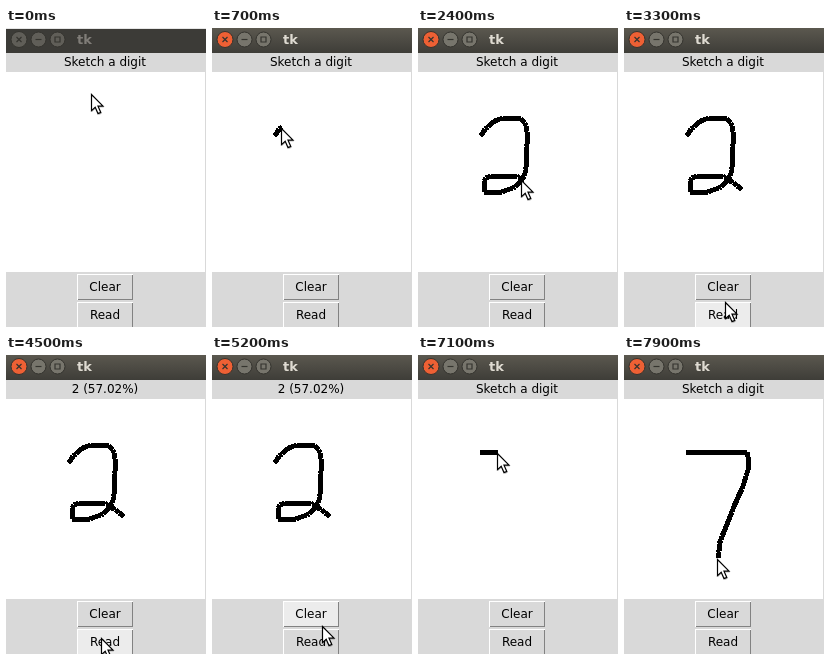
Recreate the animation shown at these times as an HTML page. Size 200 by 299 pixels, loop 8000 ms.

```html
<!DOCTYPE html>
<html lang="en">
<head>
<meta charset="utf-8">
<title>tk</title>
<style>
  html, body { margin: 0; width: 100%; height: 100%; overflow: hidden; background: #d9d9d9; }
  body { position: relative; font: 12px "DejaVu Sans", sans-serif; text-align: center; }
  body > * { position: absolute; left: 0; }
  svg { top: 0; width: 200px; height: 299px; }
  #bar { top: 0; width: 200px; height: 25px; background: linear-gradient(#5b584f, #3e3d38); color: #dfdbd2; }
  #bar.idle { background: #3c3b37; box-shadow: inset 0 1px #e6e6e6; color: #807d78; }
  #bar b { position: absolute; left: 71px; font-size: 13px; line-height: 23px; }
  #bar circle { fill: #77756c; stroke: #34332e; }
  #bar g:first-child circle { fill: #ee6034; }
  #bar.idle g circle { fill: #605e58; }
  #bar path { fill: none; stroke: #35342f; stroke-width: 1.2; }
  #label { top: 25px; width: 198px; line-height: 18px; }
  #paper { top: 44px; width: 199px; height: 200px; background: #fff; }
  .button { left: 71px; width: 56px; height: 26px; line-height: 26px;
            box-shadow: inset 1px 1px #fff, inset -1px -1px #828282; }
  .button.hot { background: #ececec; }
  .button.down { box-shadow: inset 1px 1px #828282, inset -1px -1px #fff; text-indent: 2px; line-height: 28px; }
  #ink { fill: none; stroke: #000; stroke-width: 5; shape-rendering: crispEdges; }
</style>
</head>
<body>
<div id="bar">
  <svg>
    <g transform="translate(13 11.5)"><circle r="8"/><path d="M-2.5-2.5L2.5 2.5M2.5-2.5L-2.5 2.5"/></g>
    <g transform="translate(32.5 11.5)"><circle r="7.5"/><path d="M-3 0H3"/></g>
    <g transform="translate(51.5 11.5)"><circle r="7.5"/><path d="M-2.5-2.5H2.5V2.5H-2.5Z"/></g>
  </svg>
  <b>tk</b>
</div>
<div id="label"></div>
<div id="paper"></div>
<div id="clear" class="button" style="top:246px">Clear</div>
<div id="read" class="button" style="top:274px">Read</div>
<svg>
  <path id="ink"/>
  <g id="cursor">
    <path d="M1 1.5V18L5 14.6L7.8 21L10.8 19.8L8 13.5H13Z" opacity=".25"/>
    <path d="M.5 .5V16.6L4.2 13.2L7 19.6L9.8 18.4L7 12.2H12Z" fill="#fff" stroke="#000" stroke-width="1.2"/>
  </g>
</svg>
<script>
const LOOP = 8000, STEP = 100;
const FOCUS = 600, READ = 4000, RESULT = 4500, CLEAR = 5700, WIPE = 6000;
const $ = id => document.getElementById(id);

const linear = u => u;
const easeOut = u => u * (2 - u);
const smooth = u => u * u * (3 - 2 * u);

function move(from, to, d, ease, pen = false) {
  const path = document.createElementNS("http://www.w3.org/2000/svg", "path");
  path.setAttribute("d", d);
  const length = path.getTotalLength();
  const at = t => {
    const u = Math.max(0, Math.min(1, (t - from) / (to - from)));
    const { x, y } = path.getPointAtLength(length * ease(u));
    return [Math.round(x), Math.round(y)];
  };
  return { from, to, pen, at };
}

const moves = [
  move(0, 300, "M86 65Q70 82 62 108", smooth),
  // the 2: arch and stem, loop, tail
  move(600, 1300, "M62 108C70 96 79 90 87 90H99C106 90 109 98 109 108L108 125", linear, true),
  move(1300, 2300, "M108 125C110 151 101 163 78 164H66V156C66 150 70 148 76 148H99", linear, true),
  move(2300, 2700, "M99 148Q105 151 118 162", linear, true),
  move(2800, 3500, "M118 162C150 200 116 250 96 282", easeOut),
  move(4900, 5700, "M96 282C115 276 113 269 105 258", easeOut),
  move(6000, 6800, "M105 258C112 215 74 125 62 97", smooth),
  // the 7
  move(6900, 7900, "M62 97H124V114C118 138 105 160 95 190L94 203", smooth, true)
];

function pointer(t) {
  return (moves.findLast(m => m.from <= t)).at(t);
}

function trail(t) {
  let d = "";
  for (const m of moves) {
    if (!m.pen || (t >= WIPE && m.from < WIPE)) continue;
    for (let s = m.from + 25; s <= Math.min(t, m.to); s += 25) d += `M${m.at(s - 25)}L${m.at(s)}`;
  }
  return d;
}

function draw(t) {
  const [x, y] = pointer(t);
  const within = (a, b) => t >= a && t < b;
  const button = (id, top, down) => {
    const hot = x >= 71 && x < 127 && y >= top && y < top + 26;
    $(id).className = `button${hot ? " hot" : ""}${down ? " down" : ""}`;
  };
  $("bar").className = t < FOCUS ? "idle" : "";
  $("label").textContent = within(RESULT, WIPE) ? "2 (57.02%)" : "Sketch a digit";
  $("ink").setAttribute("d", trail(t));
  button("clear", 246, within(CLEAR, WIPE));
  button("read", 272, within(READ, RESULT));
  $("cursor").setAttribute("transform", `translate(${x - 1} ${y + 1})`);
}

let begin, shown;
function tick(now) {
  begin ??= now;
  const t = Math.floor((now - begin) % LOOP / STEP) * STEP;
  if (t !== shown) draw(shown = t);
  requestAnimationFrame(tick);
}
draw(0);
requestAnimationFrame(tick);
</script>
</body>
</html>
```
